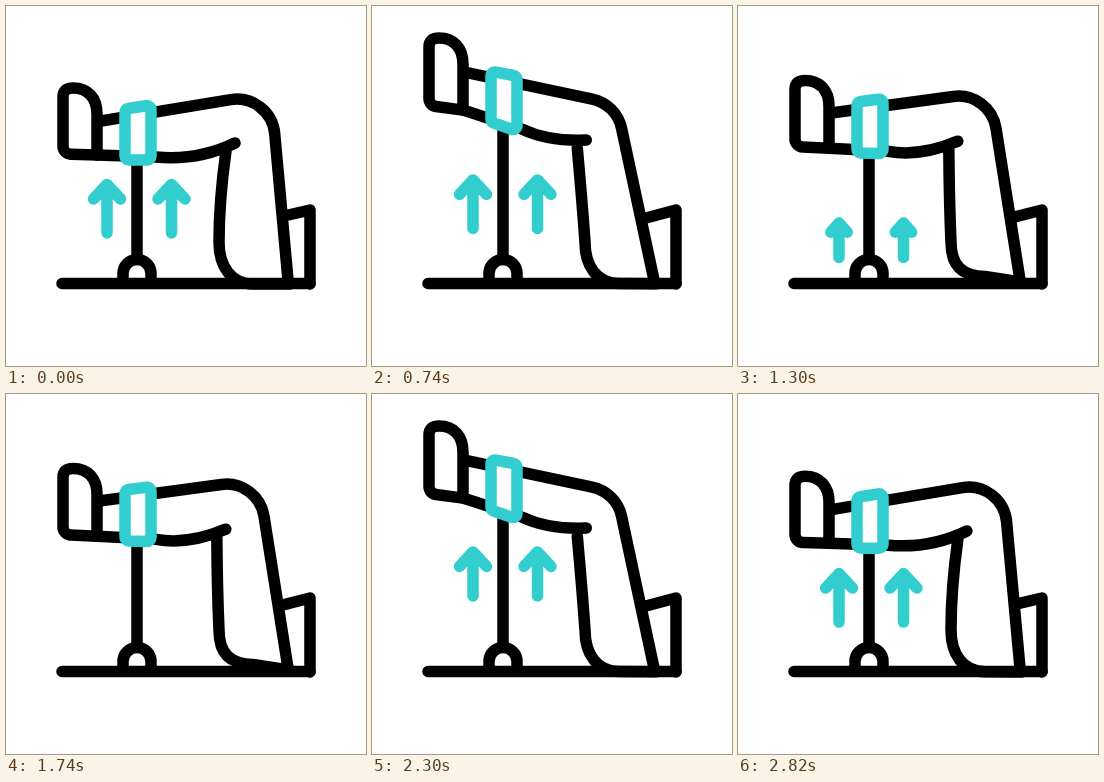
Write an HTML page with a canvas that moves like this. It is 360 px wide and 360 px high and loops after 3260 ms.

```html
<!DOCTYPE html>
<html lang="en">
<head>
<meta charset="utf-8">
<title>Leg raise</title>
<style>
  html, body { margin: 0; width: 100%; height: 100%; overflow: hidden; background: #fff; }
  canvas { display: block; width: 360px; height: 360px; }
</style>
</head>
<body>
<canvas id="stage" width="360" height="360"></canvas>
<script>
const ctx = document.getElementById('stage').getContext('2d');
const LOOP = 3260, STEP = 20, STEPS = 132;
const DIP = 10.6, HALF = (STEPS / 2 - DIP) / 3;
const TEAL = '#32cdcf', FLOOR = 277.5;

const clamp = (v, lo, hi) => Math.min(hi, Math.max(lo, v));
const mix = (a, b, k) => a + (b - a) * k;
const ease = t => (1 - Math.cos(Math.PI * t)) / 2;

// drop: how far the foot sinks; sway: how far the knee has swung back (0 to 1).
// The leg first sinks from rest, then swings up and down; the second half mirrors the first.
function poseAt(step) {
  const s = Math.min(step, STEPS - step);
  if (s < DIP) {
    const k = ease(s / DIP);
    return { drop: 16.5 * k, sway: 0.4 * k };
  }
  const k = ease((s - DIP) / HALF);
  return { drop: mix(16.5, -52, k), sway: mix(0.4, 1, k) };
}

function stroke(color, build) {
  ctx.strokeStyle = color;
  ctx.beginPath();
  build(ctx);
  ctx.stroke();
}

function drawFoot(drop) {
  const toe = 82 + drop, heel = 149 + 0.9 * drop;
  stroke('#000', c => {
    c.moveTo(91, heel);
    c.arcTo(57, 148 + 0.97 * drop, 57, toe + 9, 8);
    c.lineTo(57, toe + 9);
    c.quadraticCurveTo(57, toe, 67, toe);
    c.bezierCurveTo(82, toe, 91, toe + 10, 91, toe + 26);
    c.lineTo(91, heel);
  });
}

function drawLeg({ drop, sway }) {
  const knee = { x: 265 - 21 * sway, y: 87 - 7 * sway - 0.36 * drop };
  const bend = { x: 229 - 15 * sway, y: 137 - 3 * sway };
  const sole = 278 - 32 * sway * (1 - sway);
  stroke('#000', c => {
    // top of the thigh, knee and shin
    c.moveTo(95, 115 + 0.93 * drop - 2 * sway);
    c.arcTo(knee.x, knee.y, 282, 274, 38);
    c.lineTo(282, 274);
    // underside of the thigh
    c.moveTo(91, 149 + 0.9 * drop);
    c.lineTo(150, 151 + 0.5 * drop - 3 * sway);
    c.quadraticCurveTo(192 - 16 * sway, 155 + 0.35 * drop - 2 * sway, bend.x, bend.y);
    // calf and heel
    c.moveTo(bend.x - 9, bend.y + 8);
    c.quadraticCurveTo(213 - 3 * sway, 195, 213, 236);
    c.bezierCurveTo(213, 260, 225, sole, 247, sole);
    c.lineTo(284, mix(278, sole, 0.25));
    // seat
    c.moveTo(278 - 8 * sway, 210 + 3 * sway);
    c.lineTo(304, 204);
    c.lineTo(304, 278);
  });
}

function drawStand() {
  stroke('#000', c => {
    c.moveTo(56, FLOOR);
    c.lineTo(304, FLOOR);
    c.moveTo(117, FLOOR);
    c.arc(131, 267.5, 14, Math.PI, 0);
    c.lineTo(145, FLOOR);
  });
}

function drawStrap({ drop, sway }) {
  const left = 0.7 * drop - 3 * sway, right = 0.5 * drop - 4 * sway;
  const corners = [[119, 103 + left], [145, 99 + right], [145, 154 + right], [119, 154 + left]];
  stroke('#000', c => {
    c.moveTo(131, 253);
    c.lineTo(131, 154 + left);
  });
  stroke(TEAL, c => {
    c.moveTo(119, 128 + left);
    corners.forEach((p, i) => c.arcTo(...p, ...corners[(i + 1) % 4], 4));
    c.closePath();
    c.fillStyle = '#fff';
    c.fill();
  });
}

// Arrows rise once per swing and rest halfway at the loop's ends.
function arrowPhase(step) {
  const middle = 13.4;
  if (step < DIP) return middle + 1.75 * step;
  if (step > STEPS - DIP) return middle * (step - STEPS + DIP) / DIP;
  return (step - DIP) % (2 * HALF);
}

function drawArrows(phase) {
  const alpha = clamp(Math.min((phase - 5) / 2, 1 - (phase - 20.6) * 0.433), 0, 1);
  if (!alpha) return;
  const u = clamp((phase - 13.4) / (phase < 13.4 ? 6 : 7), -1, 1);
  const size = clamp(Math.min((phase - 5.1) * 0.3, 1 - (phase - 20.1) * 0.213), 0, 1);
  const bottom = 227 - 25 * u * Math.abs(u);
  const tip = bottom - 48.5 * size;
  const arm = 13.5 * Math.min(1, 1.1 * size) ** 2;
  ctx.globalAlpha = alpha;
  stroke(TEAL, c => {
    for (const x of [101, 165.5]) {
      c.moveTo(x, bottom);
      c.lineTo(x, tip);
      c.moveTo(x - arm, tip + arm + 1);
      c.lineTo(x, tip);
      c.lineTo(x + arm, tip + arm + 1);
    }
  });
  ctx.globalAlpha = 1;
}

function draw(now) {
  const step = clamp(Math.floor((now % LOOP - 200) / STEP), 0, STEPS - 1);
  const pose = poseAt(step);
  ctx.fillStyle = '#fff';
  ctx.fillRect(0, 0, 360, 360);
  ctx.lineWidth = 11.5;
  ctx.lineCap = ctx.lineJoin = 'round';
  drawFoot(pose.drop);
  drawLeg(pose);
  drawStand();
  drawStrap(pose);
  drawArrows(arrowPhase(step));
}

const start = performance.now();
function frame() {
  draw(performance.now() - start);
  requestAnimationFrame(frame);
}
frame();
</script>
</body>
</html>
```
